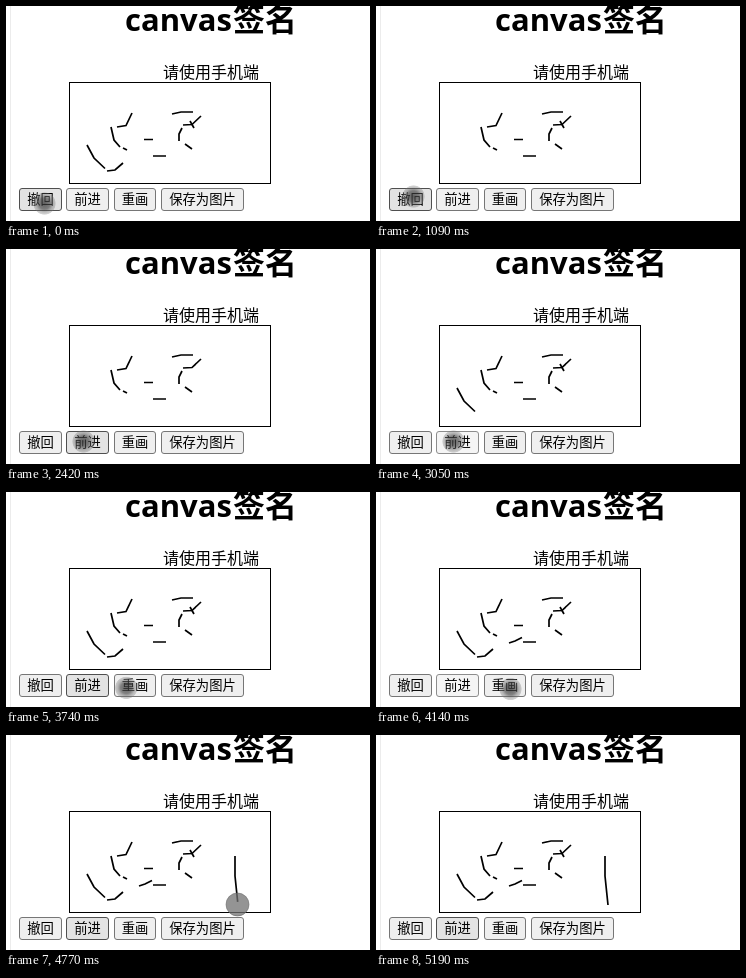
Write an HTML page that moves like this. It is 364x215 px and loops after 6.06 s.

```html
<!DOCTYPE html>
<html lang="zh">
<head>
<meta charset="utf-8">
<title>canvas签名</title>
<style>
html, body { margin: 0; width: 100%; height: 100%; overflow: hidden; background: #fff; }
svg { display: block; }
text { font-family: "Noto Sans CJK SC", "Noto Sans CJK", sans-serif; }
.title { font-weight: 700; font-size: 32px; }
.latin { font-family: "Open Sans", "Noto Sans", sans-serif; font-size: 31px; }
.button rect { fill: #efefef; stroke: #767676; }
.button.hover rect { fill: #e3e3e3; stroke: #4f4f4f; }
.button.active rect { fill: #f5f5f5; stroke: #8d8d8d; }
.button text { font-size: 13.333px; text-anchor: middle; }
#ink path { fill: none; stroke: #000; stroke-width: 1.7; }
#cursor { fill: url(#blur); }
#cursor.touch { fill: rgba(112, 112, 112, .75); stroke: rgba(100, 100, 100, .5); }
</style>
</head>
<body>
<svg width="364" height="215" viewBox="0 0 364 215">
  <defs>
    <radialGradient id="blur">
      <stop offset="0" stop-color="#333" stop-opacity=".75"/>
      <stop offset=".5" stop-color="#444" stop-opacity=".64"/>
      <stop offset=".75" stop-color="#666" stop-opacity=".42"/>
      <stop offset=".93" stop-color="#777" stop-opacity=".33"/>
      <stop offset="1" stop-color="#888" stop-opacity="0"/>
    </radialGradient>
  </defs>
  <path d="M4.5 0V215" stroke="#ececec"/>
  <text class="title latin" x="119" y="25">canvas</text>
  <text class="title" x="227" y="25.3">签名</text>
  <text x="157" y="71.6" font-size="16">请使用手机端</text>
  <rect x="63.5" y="76.5" width="201" height="101" fill="none" stroke="#000"/>
  <g id="ink">
    <path d="M111 121L120 119.5L126 107M105 121L108 134L114 141M117 142L121 144"/>
    <path d="M138 133.5H147M147 150H160M166 108L175 106H187"/>
    <path d="M195 110L186 118.5L177 119M176 122L173 128V135M179 138L186 143"/>
    <path id="dash" d="M133 151L139 149L146 145.5"/>
    <path id="chin" d="M101 165L109 164L117 157"/>
    <path id="cheek" d="M81 139L88 152L99 162.5"/>
    <path id="tick" d="M184 115L188 122"/>
    <path id="fresh" d="M229 121V141L232 170" pathLength="1"/>
  </g>
  <g id="buttons"></g>
  <circle id="cursor" r="11.5"/>
</svg>
<script>
const LOOP = 6060, STEP = 120, TAP = 150;
const LEAVE_UNDO = 2270, RELEASE = 4260, DRAW = 4530, END = 5190;
const $ = id => document.getElementById(id);
const easeOut = p => 1 - (1 - p) ** 2;

// Each stroke disappears on an undo tap and returns on a redo tap
const edits = [
  { id: 'dash', undo: 0, redo: 3860 },
  { id: 'chin', undo: 150, redo: 3320 },
  { id: 'cheek', undo: 270, redo: 3050 },
  { id: 'tick', undo: 1460, redo: 2540 }
];

// Cursor moves in a few eased hops
const start = { x: 38.5, y: 197.5 };
const moves = [
  { t: 1090, hops: 1, x: 37.5, y: 190.5 },
  { t: 1730, hops: 4, x: 77.5, y: 192.5 },
  { t: 3740, hops: 2, x: 134.5, y: 197 },
  { t: RELEASE, hops: 1, x: 239.5, y: 199.5 },
  { t: 4410, hops: 1, x: 228.5, y: 119.5 },
  { t: DRAW, hops: 3, x: 231.5, y: 169.5 },
  { t: 4920, hops: 2, x: 276.5, y: 188.5 }
];

// Progress that advances in equal hops, the first one at time t0
function hop(t, t0, hops) {
  const n = Math.floor((t - t0) / STEP) + 1;
  return easeOut(Math.min(Math.max(n / hops, 0), 1));
}

function cursorAt(t) {
  let { x, y } = start;
  for (const m of moves) {
    const p = hop(t, m.t, m.hops);
    x += (m.x - x) * p;
    y += (m.y - y) * p;
  }
  return { x, y };
}

let left = 13;
const buttons = ['撤回', '前进', '重画', '保存为图片'].map(label => {
  const width = label.length * 13.333 + 16;
  const x = Math.round(left), w = Math.round(left + width) - x;
  left += width + 4.7;
  $('buttons').insertAdjacentHTML('beforeend', `<g class="button">
    <rect x="${x + .5}" y="182.5" width="${w - 1}" height="22" rx="2.5"/>
    <text x="${x + w / 2}" y="198.4">${label}</text></g>`);
  return $('buttons').lastElementChild;
});

function setState(button, hover, active) {
  button.setAttribute('class', 'button ' + (active ? 'active' : hover ? 'hover' : ''));
}

function render(t) {
  const tapped = key => edits.some(e => e[key] && t >= e[key] && t < e[key] + TAP);
  for (const e of edits) {
    $(e.id).style.display = t >= e.undo && t < e.redo ? 'none' : '';
  }
  // The last redo press is held until the pointer has left the button
  const held = t >= edits[0].redo && t < RELEASE;
  setState(buttons[0], t < LEAVE_UNDO, tapped('undo') || (t >= 790 && t < 790 + TAP));
  setState(buttons[1], t >= LEAVE_UNDO, tapped('redo') || held);

  const fresh = $('fresh');
  fresh.style.display = t < DRAW ? 'none' : '';
  fresh.setAttribute('stroke-dasharray', `${hop(t, DRAW, 4)} 2`);

  const { x, y } = cursorAt(t), cursor = $('cursor');
  cursor.setAttribute('cx', x);
  cursor.setAttribute('cy', y);
  cursor.setAttribute('class', t >= 4410 && t < 5040 ? 'touch' : '');
  cursor.style.display = t < END ? '' : 'none';
}

const begin = performance.now();
function tick() {
  render((performance.now() - begin) % LOOP);
  requestAnimationFrame(tick);
}
tick();
</script>
</body>
</html>
```
